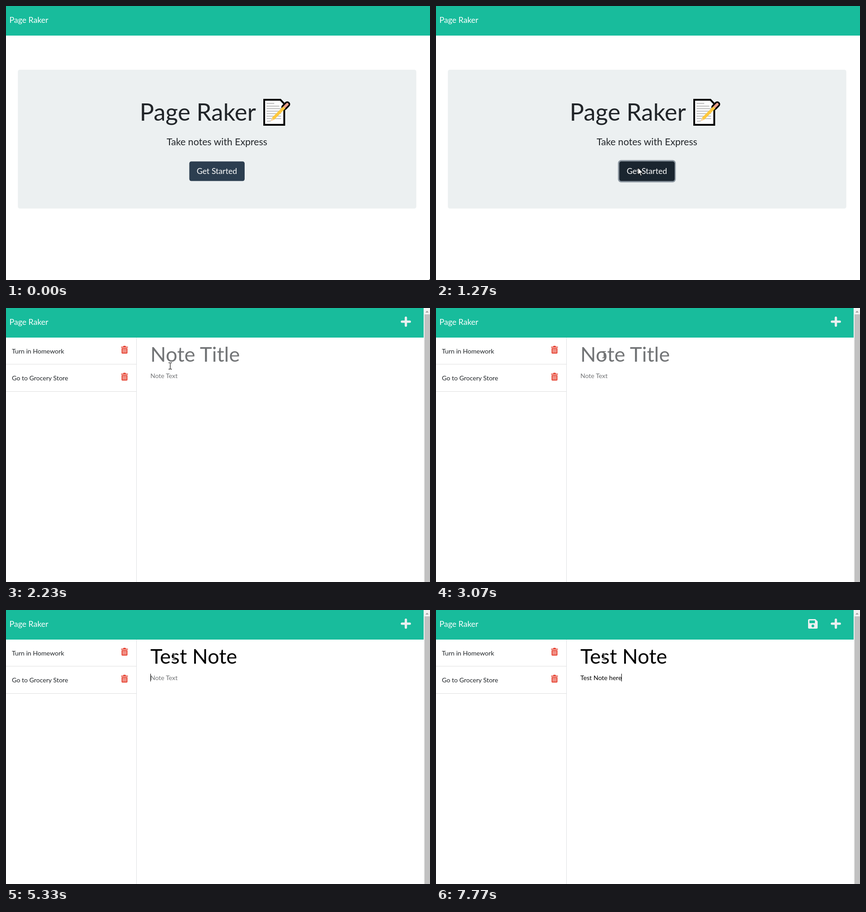
Animation of 931x602 px, one loop 8000 ms. Source, as an HTML page:

```html
<!DOCTYPE html>
<html lang="en">
<head>
<meta charset="utf-8">
<title>Page Raker</title>
<style>
html, body { margin: 0; width: 100%; height: 100%; overflow: hidden; background: #fff; }
svg { display: block; width: 931px; height: 602px; }
text { font-family: Lato, "Open Sans", sans-serif; font-size: 14.06px; fill: #212529; white-space: pre; }
.brand { font-size: 17.58px; fill: #fff; }
.big { font-size: 45px; }
#beam { mix-blend-mode: difference; }
</style>
</head>
<body>
<svg viewBox="0 0 931 602">
  <defs>
    <g id="trash" fill="#e74c3c">
      <path d="M0 2h4.3l1-2h4.4l1 2H15v2H0z"/>
      <path d="M1 5h13v10.5q0 1.8-1.8 1.8H2.8Q1 17.3 1 15.500z"/>
      <path d="M4.500 7v8M7.500 7v8M10.500 7v8" stroke="#fff" stroke-width="1.1"/>
    </g>
  </defs>
  <rect width="931" height="602" fill="#fff"/>

  <g id="home">
    <rect width="931" height="65" fill="#18bc9c"/>
    <text class="brand" x="7.5" y="37.300">Page Raker</text>
    <rect x="26" y="140" width="875" height="305" rx="4.500" fill="#ecf0f1"/>
    <text x="293.500" y="252" style="font-size:52.5px">Page Raker</text>
    <g id="memo" fill="none">
      <path d="M567 206h35.500l8.500 9v46h-44z" fill="#fff" stroke="#000" stroke-width="4"/>
      <path d="M572 214h17M572 220h28M572 225.500h34M572 231h34M572 236.500h32M572 242h32M572 247.500h32" stroke="#a8a8a8" stroke-width="1.6"/>
      <path d="M611 222.500L617.500 216" stroke="#000" stroke-width="13" stroke-linecap="round"/>
      <path d="M586 248L611.500 222.500" stroke="#ffc83d" stroke-width="6.5"/>
      <path d="M583.700 245.700l4.600 4.600-7.300 3z" fill="#f7d7a0"/>
      <path d="M573 253h5l3.500-.5" stroke="#777" stroke-width="1.200"/>
      <path d="M612.500 221L617.500 216" stroke="#e8a08c" stroke-width="6" stroke-linecap="round"/>
    </g>
    <text x="463.200" y="306" text-anchor="middle" style="font-size:21.1px">Take notes with Express</text>
    <rect id="ring" x="399.500" y="338.500" width="127" height="49" rx="7" fill="#2c3e50"/>
    <rect id="button" x="402.500" y="341.500" width="121.500" height="43" rx="4.500"/>
    <text class="brand" x="463" y="369.300" text-anchor="middle">Get Started</text>
    <path id="arrow" d="M0 0v15l3.500-3.300 2.500 6 2.300-1-2.500-5.700h4.900z" fill="#fff" stroke="#000" stroke-width=".9"/>
  </g>

  <g id="notes">
    <rect width="917" height="65" fill="#18bc9c"/>
    <text class="brand" x="7.500" y="37.300">Page Raker</text>
    <g id="save">
      <path d="M819.500 20h13.500l5 5v13.500q0 2.500-2.500 2.500h-16q-2.500 0-2.500-2.500v-16q0-2.500 2.500-2.500z" fill="#ecf0f1"/>
      <path d="M820 23h12v6h-12z" fill="#18bc9c"/>
      <circle cx="827.500" cy="35" r="3" fill="#18bc9c"/>
    </g>
    <path d="M878 21.300v17.400M869.300 30h17.400" stroke="#ecf0f1" stroke-width="5" stroke-linecap="round"/>
    <path d="M286.500 65v537" stroke="#dfe1e3"/>
    <g id="list">
      <path d="M0 123.500h286M0 183.500h286" stroke="#dfdfdf"/>
      <text x="13" y="99.500">Turn in Homework</text>
      <text x="13" y="158.900">Go to Grocery Store</text>
      <use href="#trash" x="252.700" y="83"/>
      <use href="#trash" x="252.700" y="142.300"/>
    </g>
    <text id="title" class="big" x="317" y="118"></text>
    <text id="body" x="317" y="154"></text>
    <rect id="caret" width="1"/>
    <rect x="917" width="14" height="602" fill="#f1f1f1"/>
    <rect x="919" y="14" width="12" height="588" fill="#c1c1c1"/>
    <path d="M921 10l3.500-4 3.500 4z" fill="#a0a0a0"/>
    <path id="beam" d="M-3.500-7h3M.500-7h3M0-6.500v13M-3.500 7h3M.500 7h3" stroke="#fff" stroke-width="1.100" fill="none"/>
  </g>
</svg>
<script>
const LOOP = 8000, PAGE = 1330, LIST = 1400, FOCUS = 2530, TAB = 5330, SAVE = 6030;
const titleKeys = [3500, 3770, 4000, 4200, 4370, 4570, 4770, 4900, 5070];
const bodyKeys = [5970, 6130, 6300, 6470, 6530, 6700, 6870, 7000, 7200, 7300, 7400, 7530, 7670, 7770];
const beamPath = [[1640, 444.5, 355.5], [1900, 402, 270], [2120, 336.5, 155], [2230, 360.5, 127.5], [2470, 369, 106.5], [2900, 369, 106.5], [2930, 369, 102.5]];

const $ = id => document.getElementById(id);
const clamp = v => Math.min(1, Math.max(0, v));
const ramp = (t, from, length) => clamp((t - from) / length);
const show = (id, on) => $(id).style.display = on ? "" : "none";
const place = (id, x, y) => $(id).setAttribute("transform", `translate(${x} ${y})`);
const mix = (a, b, k) => a.map((v, i) => v + (b[i] - v) * k);

function along(path, t) {
  if (t <= path[0][0]) return path[0].slice(1);
  for (let i = 1; i < path.length; i++) {
    const [a, b] = [path[i - 1], path[i]];
    if (t < b[0]) return mix(a, b, (t - a[0]) / (b[0] - a[0])).slice(1);
  }
  return path[path.length - 1].slice(1);
}

// Shows the typed part, or the placeholder; returns the caret offset and last key time.
function type(id, text, hint, keys, t) {
  const count = keys.filter(k => k <= t).length, el = $(id);
  const shown = count ? text.slice(0, count) : hint;
  if (el.textContent !== shown) el.textContent = shown;
  el.style.fill = count ? "#000" : "#727476";
  return { offset: count ? el.getComputedTextLength() : 0, last: count ? keys[count - 1] : 0 };
}

function drawHome(t) {
  const u = 1 - (1 - ramp(t, 40, 530)) ** 2;
  place("arrow", ...mix([930, 600.5], [443.5, 355.5], u));
  const press = ramp(t, 1030, 150);
  const hover = mix([44, 62, 80], [30, 43, 55], ramp(t, 395, 150));
  $("button").setAttribute("fill", `rgb(${mix(hover, [26, 37, 47], press)})`);
  $("ring").setAttribute("opacity", press * .5);
}

function drawNotes(t) {
  show("list", t >= LIST);
  show("save", t >= SAVE);
  place("beam", ...along(beamPath, t));
  const title = type("title", "Test Note", "Note Title", titleKeys, t);
  const body = type("body", "Test Note here", "Note Text", bodyKeys, t);
  const inBody = t >= TAB, field = inBody ? body : title;
  const since = t - Math.max(inBody ? TAB : FOCUS, field.last);
  const caret = $("caret");
  caret.setAttribute("x", Math.floor(317 + field.offset));
  caret.setAttribute("y", inBody ? 140 : 77);
  caret.setAttribute("height", inBody ? 17 : 47);
  show("caret", t >= FOCUS && since % 1080 < 540);
}

function frame(now) {
  const t = now % LOOP, home = t < PAGE;
  show("home", home);
  show("notes", !home);
  home ? drawHome(t) : drawNotes(t);
}

const start = performance.now();
function tick() {
  frame(performance.now() - start);
  requestAnimationFrame(tick);
}
tick();
</script>
</body>
</html>
```
